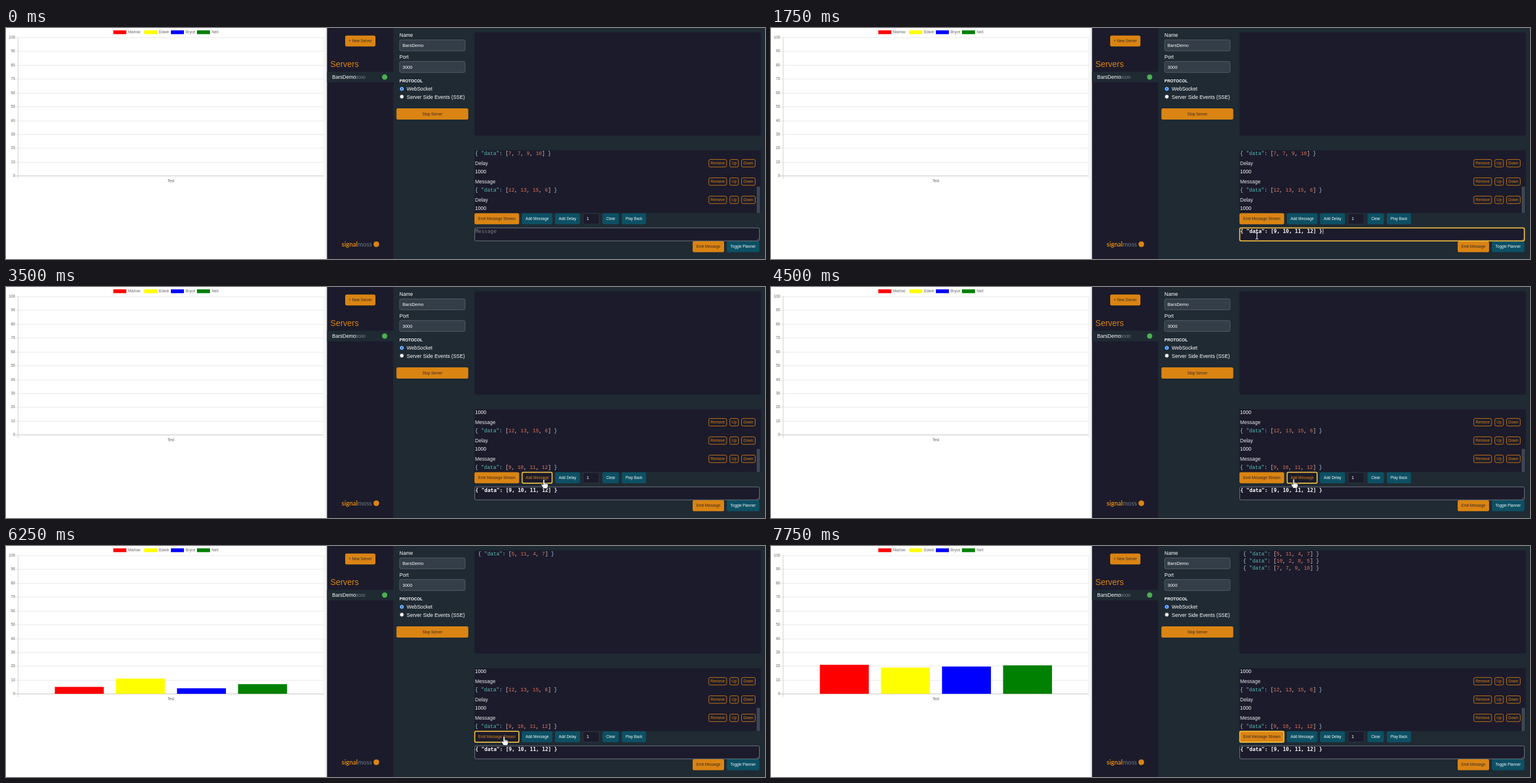
An HTML page for the animation above (8000 ms loop, 1280 by 391 pixels).

```html
<!DOCTYPE html>
<html lang="en">
<head>
<meta charset="utf-8">
<title>Socket chart demo</title>
<style>
html, body { margin: 0; width: 100%; height: 100%; overflow: hidden; background: #1f2a33; }
svg { display: block; width: 1280px; height: 391px; }
text { font-family: "Liberation Sans", Arial, sans-serif; white-space: pre; }
.code { font-family: "Liberation Mono", "Courier New", monospace; }
.area { font-family: "DejaVu Sans Mono", monospace; }
.logo { font-family: Lato, sans-serif; font-weight: 700; }
</style>
</head>
<body>
<svg id="stage" viewBox="0 0 1280 391">
  <defs>
    <linearGradient id="edge"><stop stop-color="#fff"/><stop offset="1" stop-color="#e2e2e4"/></linearGradient>
    <clipPath id="listClip"><rect x="790" y="207" width="483" height="106"/></clipPath>
  </defs>
  <g id="base"></g>
  <g id="live"></g>
</svg>
<script>
const LOOP = 8000, STEP = 250;
const DARK = '#1c1b2b', SLATE = '#1f2a33', ORANGE = '#da8413', TEAL = '#0d5064',
      GOLD = '#f5c242', WHITE = '#fff', GREY = '#666';
const BIG = 8.53, MID = 7.47, SMALL = 6.4;

const rect = (x, y, w, h, fill, r = 0, stroke = 'none', sw = 1) =>
  `<rect x="${x}" y="${y}" width="${w}" height="${h}" rx="${r}" fill="${fill}" stroke="${stroke}" stroke-width="${sw}"/>`;
const line = (x1, y1, x2, y2, stroke, w = 1) =>
  `<path d="M${x1} ${y1}L${x2} ${y2}" stroke="${stroke}" stroke-width="${w}"/>`;
const circle = (x, y, r, fill, extra = '') => `<circle cx="${x}" cy="${y}" r="${r}" fill="${fill}" ${extra}/>`;

// Text placed by the middle of its capitals
const text = (s, x, cy, size, fill, extra = '') =>
  `<text x="${x}" y="${cy + size * 0.36}" font-size="${size}" fill="${fill}" ${extra}>${s}</text>`;
const MIDDLE = 'text-anchor="middle"';

const json = values => `{ "data": [${values.join(', ')}] }`;

function code(values, x, cy) {
  const colored = json(values).replace(/"data"|\d+|[{}:]|[\[\],]/g, token => {
    const fill = token === '"data"' ? '#56bdb4' : /\d/.test(token) ? '#e2745c'
      : /[{}:]/.test(token) ? '#a9d6e4' : '#dcc9c4';
    return `<tspan fill="${fill}">${token}</tspan>`;
  });
  return text(colored, x, cy, BIG, WHITE, 'class="code"');
}

function button(label, x, y, w, h, look, hover, focus) {
  const teal = look === 'teal';
  const fill = hover ? DARK : teal ? TEAL : ORANGE;
  const ink = hover ? ORANGE : teal ? '#f2f6f7' : '#3a2a22';
  const ring = focus ? rect(x + .5, y + .2, w - 1, h - .4, 'none', 2, GOLD, 1.7)
    : hover ? rect(x + .5, y + .5, w - 1, h - 1, 'none', 2.5, ORANGE) : '';
  return rect(x, y, w, h, fill, 2.8) + ring + text(label, x + w / 2, y + h / 2 - .3, SMALL, ink, MIDDLE);
}

const outline = (label, x, w, cy) =>
  rect(x + .5, cy - 6.2, w - 1, 12.6, 'none', 2.3, ORANGE, .9) + text(label, x + w / 2, cy, SMALL, ORANGE, MIDDLE);

const field = (value, x, y, w, h) =>
  rect(x + .5, y + .5, w - 1, h - 1, '#343e49', 2.5, '#58626c', .9) + text(value, x + 5.5, y + h / 2, MID, WHITE);

// Chart
const ZERO = 250.2, UNIT = 2.342;
const series = [['Marlow', 'red', 181], ['Edwin', 'yellow', 233], ['Bryce', 'blue', 278], ['Neil', 'green', 322]];

function chartFrame() {
  let out = rect(0, 0, 541.5, 391, WHITE) + rect(536.5, 0, 5, 391, 'url(#edge)');
  for (const [name, color, x] of series)
    out += rect(x, 4, 22, 6.4, color) + text(name, x + 25, 7, SMALL, GREY);
  for (let v = 0; v <= 100; v += 10) {
    const y = Math.round(ZERO - v * UNIT);
    out += line(15, y + .3, 536, y + .3, v ? '#e5e5e5' : '#bbb', .9)
      + text(v, 15.3, y - .2, SMALL, GREY, 'text-anchor="end"');
  }
  return out + line(20.4, 16, 20.4, 255.5, '#c4c4c4', .8) + line(535.8, 16, 535.8, 255.5, '#e8e8e8', .8)
    + text('Test', 278, 259, SMALL, GREY, MIDDLE);
}

function sidebar() {
  return rect(541.5, 0, 111.5, 391, DARK)
    + button('+ New Server', 572, 12.7, 51, 18.6)
    + text('Servers', 547, 60.5, 13.9, ORANGE)
    + rect(541.5, 74, 111.5, 18, SLATE)
    + text('BarsDemo', 550, 82.8, BIG, WHITE) + text(':3000', 587.5, 83, MID, '#7d858c')
    + circle(638.6, 83, 4.5, '#4caf50')
    + text(`signal<tspan fill="#56616d">moss</tspan>`, 566, 366.3, 10.6, ORANGE, 'class="logo"')
    + circle(624.5, 366, 4.8, ORANGE);
}

function form() {
  return text('Name', 663.5, 12, BIG, WHITE) + field('BarsDemo', 663.3, 19.6, 111.4, 19.6)
    + text('Port', 663.5, 48.7, BIG, WHITE) + field('3000', 663.3, 56.2, 111.4, 19.6)
    + text('PROTOCOL', 663.5, 89, 6.95, WHITE, 'font-weight="700"')
    + circle(667.5, 103, 3.1, WHITE, 'stroke="#1a73e8" stroke-width=".9"') + circle(667.5, 103, 1.9, '#1a73e8')
    + circle(667.5, 116.2, 3.1, WHITE, 'stroke="#767676" stroke-width=".7"')
    + text('WebSocket', 675.8, 103.3, BIG, WHITE)
    + text('Server Side Events (SSE)', 675.8, 116.5, BIG, WHITE)
    + button('Stop Server', 658.4, 136, 121.2, 19);
}

function planner() {
  return rect(790, 7.5, 483, 174.5, DARK, 3) + rect(790, 207, 483, 106, DARK, 1)
    + button('Add Delay', 926, 313.5, 42, 18.8, 'teal')
    + rect(973.2, 313.9, 27.2, 18, DARK, 2.5, '#303b47', .9) + text('1', 979, 322.8, MID, WHITE)
    + button('Clear', 1006, 313.5, 27.6, 18.8, 'teal')
    + button('Play Back', 1038.6, 313.5, 40.8, 18.8, 'teal')
    + button('Emit Message', 1158, 360.7, 53, 18.8)
    + button('Toggle Planner', 1215.6, 360.7, 55, 18.8, 'teal');
}

// Queue rows visible in the planner list
const rowY = [212, 228.6, 243, 259.6, 274, 290.6, 305];
const before = [[7, 7, 9, 10], 'Delay', '1000', 'Message', [12, 13, 15, 6], 'Delay', '1000'];
const after = ['1000', 'Message', [12, 13, 15, 6], 'Delay', '1000', 'Message', [9, 10, 11, 12]];

function list(t) {
  const added = t >= 3500, top = added ? 274 : 268.5;
  const rows = (added ? after : before).map((row, i) => {
    const y = rowY[i];
    if (Array.isArray(row)) return code(row, 791, y - .5);
    let out = text(row, 791, y, BIG, row === '1000' ? WHITE : '#e6e8ec');
    if (row !== '1000')
      out += outline('Remove', 1184.7, 31, y + .2) + outline('Up', 1220.2, 15.4, y + .2) + outline('Down', 1240, 24, y + .2);
    return out;
  }).join('');
  return `<g clip-path="url(#listClip)">${rows}${rect(1266, top, 5.6, 313 - top, '#3d4753')}</g>`;
}

function messageBox(t) {
  const focus = t >= 1000 && t < 3250, filled = t >= 1500;
  let out = rect(790.5, 338.3, 480, 22, DARK, 2.3, focus ? GOLD : '#7a828b', focus ? 1.8 : .9)
    + line(1266, 359.5, 1269.5, 356, '#8b9199', .5) + line(1268, 359.5, 1269.5, 358, '#8b9199', .5);
  out += filled ? text(json([9, 10, 11, 12]), 791.5, 344.2, 8.5, WHITE, 'class="area" font-weight="700"')
    : text('Message', 791.5, 344.2, 8.5, '#777b84', 'class="area"');
  if (t >= 1750 && focus) out += line(931, 339.8, 931, 348.8, WHITE, .8);
  return out;
}

// Each emitted message adds to the running totals
const sent = [[5, 11, 4, 7], [10, 2, 8, 5], [7, 7, 9, 10]];
const FIRST = 5366, GAP = 1000;
const easeOutQuart = p => 1 - (1 - p) ** 4;
const progress = (t, i) => easeOutQuart(Math.min(1, Math.max(0, (t - FIRST - i * GAP) / 1000)));

function bars(t) {
  return series.map(([, color], k) => {
    const total = sent.reduce((sum, m, i) => sum + m[k] * progress(t, i), 0);
    return total ? rect(82.4 + k * 103, ZERO - total * UNIT, 82.5, total * UNIT, color) : '';
  }).join('');
}

const log = t => sent.map((m, i) => t >= FIRST + i * GAP ? code(m, 796.3, 12.8 + i * 12.3) : '').join('');

// Pointer: start time, kind, hot spot
const pointer = [
  [0], [250, 'arrow', 700, 380], [500, 'arrow', 778, 366], [750, 'beam', 812, 353], [1000, 'beam', 819.5, 352],
  [2250, 'beam', 830, 356], [2500, 'beam', 866, 350], [2750, 'hand', 890, 327], [3000, 'hand', 904, 324],
  [3250, 'hand', 907, 325.5], [3750, 'hand', 905, 325.5], [4000, 'hand', 899, 325], [4250, 'hand', 889, 325],
  [4500, 'hand', 881.5, 325], [4750, 'hand', 853, 322], [5000, 'hand', 839.8, 322], [7500, 'arrow', 868, 383], [7750]
];
const shapes = {
  arrow: '<path d="M0 0V11L2.6 8.6L4.3 12.4L6 11.6L4.3 8H7.8Z" fill="#fff" stroke="#000" stroke-width=".7"/>',
  beam: '<path d="M-2.3-5.3Q0-5.3 0-4Q0-5.3 2.3-5.3M0-4V4M-2.3 5.3Q0 5.3 0 4Q0 5.3 2.3 5.3" fill="none" stroke="#fff" stroke-width="1"/>',
  hand: '<path d="M-1.3 1Q0-.8 1.3 1V6Q2.8 5 3.6 6.5Q5 5.8 5.6 7.2Q7.2 6.7 7.2 8.5V11.5L5.8 15.5H-.8L-3.8 10.5Q-5 8.6-3.6 8Q-2.5 7.8-1.3 9.6Z" fill="#fff" stroke="#000" stroke-width=".7"/><path d="M1.3 6V9M3.6 6.5V9.2M5.6 7.5V9.5" stroke="#000" stroke-width=".5"/>'
};

function cursor(t) {
  const [, kind, x, y] = pointer.findLast(p => p[0] <= t);
  return kind ? `<g transform="translate(${x} ${y})">${shapes[kind]}</g>` : '';
}

function scene(t) {
  return bars(t) + log(t) + list(t)
    + button('Emit Message Stream', 790, 313.5, 75.4, 18.8, 'orange', t >= 4750 && t < 7500, t >= 5500)
    + button('Add Message', 870, 313.5, 51.4, 18.8, 'teal', t >= 2750 && t < 4750, t >= 3250 && t < 5500)
    + messageBox(t) + cursor(t);
}

document.getElementById('base').innerHTML = chartFrame() + sidebar() + form() + planner();
const live = document.getElementById('live');
const start = performance.now();
let shown = -1;

function tick() {
  const t = Math.floor((performance.now() - start) % LOOP / STEP) * STEP;
  if (t !== shown) live.innerHTML = scene(shown = t);
  requestAnimationFrame(tick);
}
tick();
</script>
</body>
</html>
```
